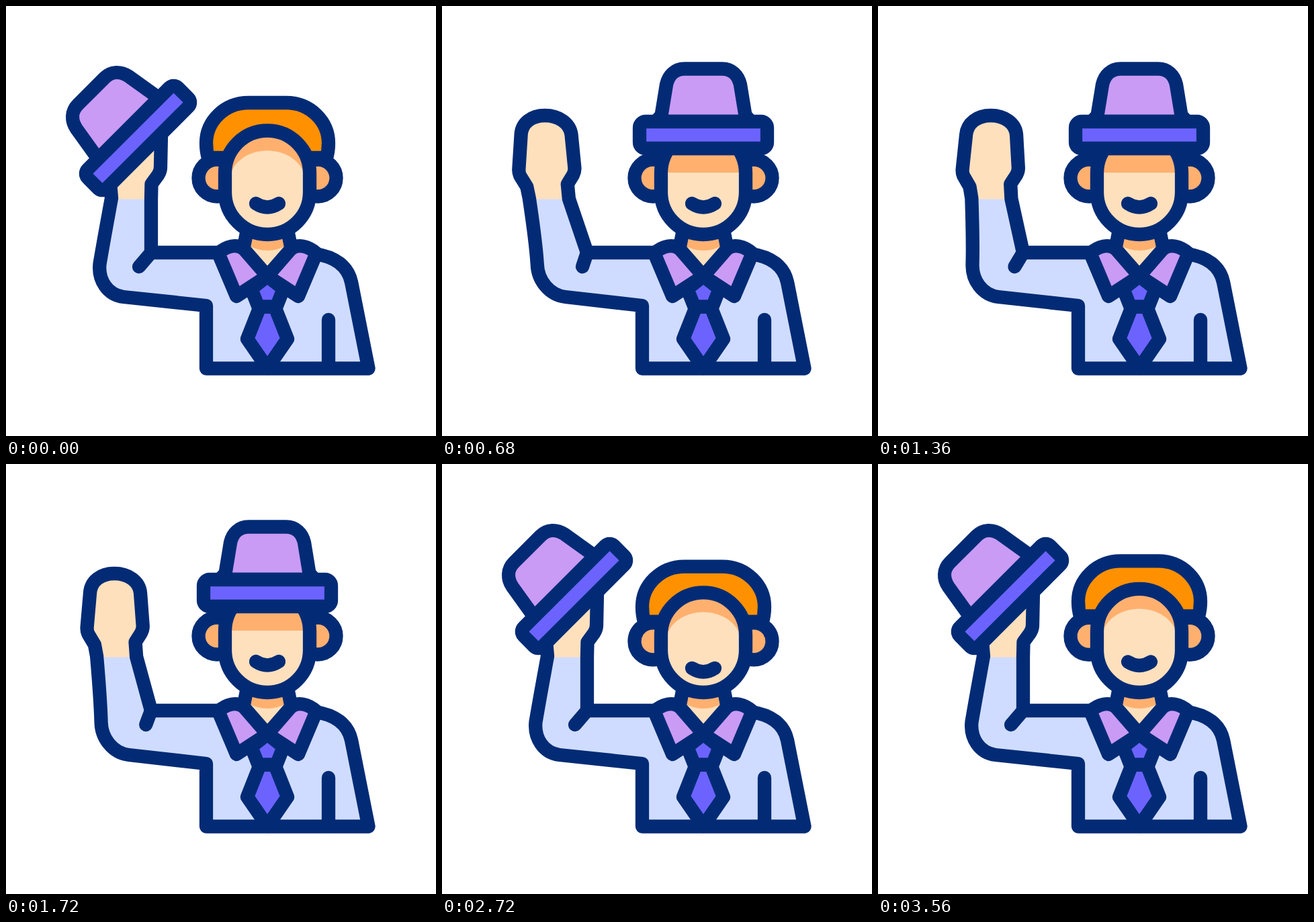
These frames come from a looping animation (640 by 640 pixels, 3.6 s). An HTML page:

```html
<!DOCTYPE html>
<html lang="en">
<head>
<meta charset="utf-8">
<title>Hat greeting</title>
<style>
  html, body { margin: 0; width: 100%; height: 100%; overflow: hidden; background: #fff; }
  svg { display: block; width: 100vw; height: 100vh; }
  svg { stroke-width: 20.3; stroke-linecap: round; stroke-linejoin: round; }
  .ink { stroke: #032b75; }
  .line { fill: none; }
  .shirt { fill: #cfdcff; }
  .skin { fill: #ffe0bd; }
  .shade { fill: #ffb06f; }
  .hair { fill: #ff9100; }
  .lilac { fill: #c99bf5; }
  .violet { fill: #6c63ff; }
</style>
</head>
<body>
<svg viewBox="0 0 640 640" xmlns="http://www.w3.org/2000/svg">
  <defs>
    <clipPath id="handClip"><rect width="640" height="287.5"/></clipPath>
    <clipPath id="faceClip"><path id="faceMask"/></clipPath>
    <path id="collar" d="M316 368C327 358 345 352 355 363L389 402L343 432Z"/>
  </defs>

  <path id="body" class="shirt"/>
  <path id="hand" class="skin" clip-path="url(#handClip)"/>
  <path id="bodyLine" class="ink line"/>
  <path id="crease" class="ink line"/>
  <path class="ink line" d="M480 467V539"/>

  <path class="skin" d="M356 330H422L424 362L389 402L354 362Z"/>
  <path class="shade" d="M356 330H422L420 355Q389 373 358 355Z"/>
  <path class="ink line" d="M358 338L354 358M420 338L424 358"/>
  <path class="ink violet" d="M378 447.5L359 495.5L389 539L419 495.5L400 447.5Z"/>
  <path class="ink violet" d="M389 402L365 421L375.5 447.5H402.5L413 421Z"/>
  <use href="#collar" class="ink lilac"/>
  <use href="#collar" class="ink lilac" transform="matrix(-1 0 0 1 778 0)"/>

  <path id="hair" class="ink hair" d="M301 226C298 216 298 209 298 204C298 172 325 144 361 144H417C453 144 480 172 480 204C480 209 480 216 477 226Z"/>
  <g id="ears" class="ink shade">
    <circle cx="314" cy="256" r="27.5"/>
    <circle cx="464" cy="256" r="27.5"/>
  </g>
  <path id="face" class="shade"/>
  <path id="cheeks" class="skin"/>
  <g clip-path="url(#faceClip)">
    <rect id="hatShade" class="shade" x="-70" y="0" width="140" height="56"/>
  </g>
  <path id="faceLine" class="ink line"/>
  <path id="mouth" class="ink line" d="M372 294Q389 305 406 294"/>

  <g id="hat">
    <path class="ink lilac" d="M-64 -20L-55 -75C-52 -89 -42 -98.5 -28 -98.5H28C42 -98.5 52 -89 55 -75L64 -20Z"/>
    <rect class="ink violet" x="-95" y="-20" width="190" height="40" rx="9"/>
  </g>
</svg>
<script>
const LOOP = 3600, STROKE = 20.3;
const WRIST_Y = 287, SHOULDER_Y = 367;

// Torso and upright arm: side, elbow, forearm, hand, wrist, upper arm.
const BODY = `M460 369C490 373 509 388 514 411L539.5 539.5H298V446
  L175 433C151 430 137 408 139.5 384C145 351 151 319 157 286L155.5 269
  L148 254Q146 250 146.5 244L156 192C159 174 175 163 195 163
  C215 163 231 174 231 192L230 240Q230 246 226 252L216.5 265L216 287L216 367H322`;

// [time, lean of the forearm, bend of the elbow]
const armKeys = [[0, 0, 0], [400, 1, 0], [800, -1.11, 1], [1200, 0, 0],
  [1580, -1.11, 1], [1990, 1, 0], [2410, 0, 0], [LOOP, 0, 0]];
const hatKeys = [[0, 0], [400, 1], [1990, 1], [2410, 0], [LOOP, 0]];

const set = (id, name, value) => document.getElementById(id).setAttribute(name, value);
const mix = (a, b, u) => a + (b - a) * u;
const ease = s => s * s * (3 - 2 * s);

function valuesAt(keys, t) {
  let i = 0;
  while (i < keys.length - 2 && t >= keys[i + 1][0]) i++;
  const a = keys[i], b = keys[i + 1];
  const u = ease((t - a[0]) / (b[0] - a[0]));
  return a.slice(1).map((v, k) => mix(v, b[k + 1], u));
}

// The forearm leans more the higher it is; the elbow slides more the lower it is.
function warp(x, y, lean, bend) {
  if (x > 250) return x;
  if (y > SHOULDER_Y) return x + 11 * bend * (y - SHOULDER_Y) / 66;
  const reach = y > WRIST_Y
    ? 41 * (SHOULDER_Y - y) / (SHOULDER_Y - WRIST_Y)
    : 41 + .18 * (WRIST_Y - y);
  return x + lean * reach;
}

const bodyPath = (lean, bend) => BODY.replace(/([\d.]+) ([\d.]+)/g,
  (_, x, y) => warp(+x, +y, lean, bend).toFixed(2) + ' ' + y);

function draw(t) {
  const [lean, bend] = valuesAt(armKeys, t), [worn] = valuesAt(hatKeys, t);
  // Two nods after the hat is off.
  const phase = Math.max(0, t - 2400) / 300 % 2;
  const nod = ease(1 - Math.abs(1 - phase));

  const body = bodyPath(lean, bend);
  for (const id of ['body', 'hand', 'bodyLine']) set(id, 'd', body);
  set('crease', 'd', `M216 367L${198 + 14 * bend} 388`);

  const brow = 248.5 + 6 * nod;
  const face = `M326 ${brow}a63 63 0 0 1 126 0V277a63 63 0 0 1 -126 0Z`;
  for (const id of ['face', 'faceMask', 'faceLine']) set(id, 'd', face);
  const rim = 256 + 5.5 * nod, arch = rim - 54.5;
  set('cheeks', 'd', `M332 ${rim}C345 ${arch} 433 ${arch} 446 ${rim}V277a57 57 0 0 1 -114 0Z`);

  set('ears', 'transform', `translate(0 ${8 * nod})`);
  set('mouth', 'transform', `translate(0 ${10 * nod})`);
  set('hair', 'transform', `translate(389 ${190 + 8.7 * nod}) scale(${1 - .1 * worn}) translate(-389 -190)`);

  // The hat's corners travel in straight lines, so it shrinks a little on the way.
  const c = mix(Math.SQRT1_2, 1, worn), s = mix(Math.SQRT1_2, 0, worn);
  const place = `matrix(${c} ${-s} ${s} ${c} ${mix(196.5, 389, worn)} ${mix(196.5, 192, worn)})`;
  set('hat', 'transform', place);
  set('hat', 'stroke-width', STROKE / Math.hypot(c, s));
  set('hatShade', 'transform', place);
}

const start = performance.now();
function tick() {
  draw((performance.now() - start) % LOOP);
  requestAnimationFrame(tick);
}
draw(0);
requestAnimationFrame(tick);
</script>
</body>
</html>
```
